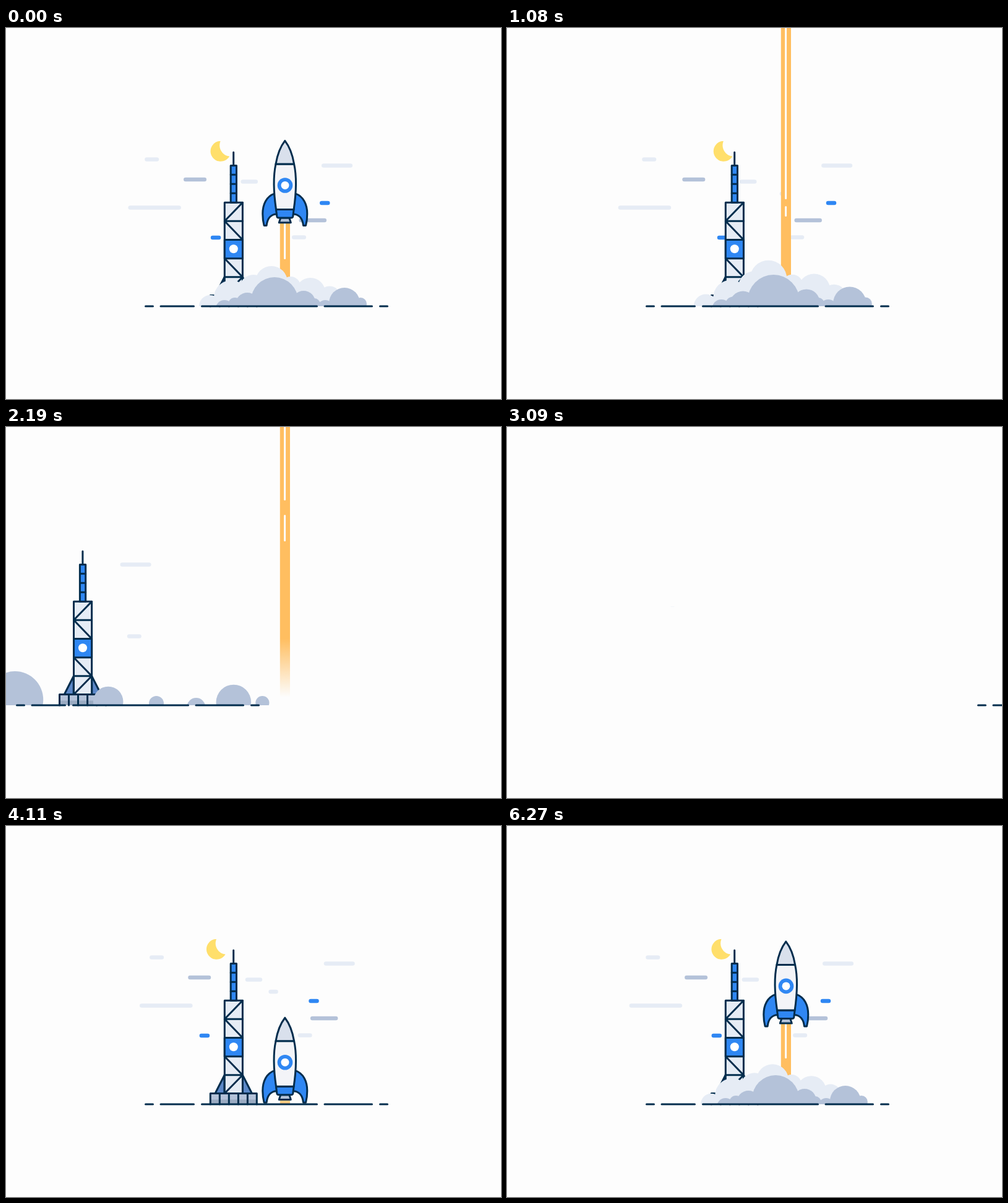
Animation, 800 px wide and 600 px high, one loop 6.3 s. Source, as an HTML page with a canvas:

```html
<!DOCTYPE html>
<html lang="en">
<head>
<meta charset="utf-8">
<title>Rocket launch</title>
<style>
html, body { margin: 0; width: 100%; height: 100%; overflow: hidden; background: #fdfdfd; }
canvas { display: block; }
</style>
</head>
<body>
<canvas id="stage" width="800" height="600"></canvas>
<script>
const ctx = document.getElementById('stage').getContext('2d');
const LOOP = 6300;
const BG = '#fdfdfd', NAVY = '#022d4d', BLUE = '#2f87f3', LIGHT = '#e6ecf5',
  GREY = '#b4c2d9', ORANGE = '#ffbe60', YELLOW = '#ffdf6b';

const clamp = v => Math.max(0, Math.min(1, v));
const easeOut = (v, power) => 1 - Math.pow(1 - clamp(v), power);
// Everything leaves to the left on a cubic and arrives from the right on a quartic.
const leave = (s, start) => -9.3e-7 * Math.pow(Math.max(0, s - start), 3);
const arrive = (s, start) => 800 * (1 - easeOut((s - start) / 850, 4));

// x, y, width, drift per second, colour, appears at, leaves at
const clouds = [
  [197.4, 290.5, 85.5, -8.5, LIGHT, -3225, 871],
  [224.2, 212.5, 23, -3.6, LIGHT, -3150, 950],
  [379.5, 248.5, 27.5, -3.3, LIGHT, -3080, 1240],
  [435.3, 268, 15.5, 5, LIGHT, -3010, 1300],
  [510, 222.5, 50, -1.7, LIGHT, -2950, 1488],
  [462, 338.5, 23, -4.4, LIGHT, -2890, 1539],
  [287, 245, 37, -3.3, GREY, -2830, 1030],
  [473.5, 311, 44.5, -8.4, GREY, -2770, 1365],
  [330.8, 339, 16.5, 8.3, BLUE, -2710, 1100],
  [507, 283, 16.5, 8.1, BLUE, -2650, 1335]
];

// x, y, radius, their rates per second, appears at, leaves at
const lightPuffs = [
  [330, 450, 19.5, -8, 0, 0, -260, 1230],
  [364, 436, 28, -2, 0, 0.5, -500, 1250],
  [400, 422, 23, -1, -3, 2, -650, 1280],
  [429, 411, 26, -6, -5, 3.5, -1600, 1300],
  [460, 418, 16, 1, -2, 1, -950, 1325],
  [492, 428, 24, 4, -4, 2, -850, 1345],
  [523, 435, 17.5, 5, 0, 2.5, -750, 1365]
];
const greyPuffs = [
  [353, 454, 14, -6, 0, 1, -1650, 1370],
  [370, 447, 11, -4, 0, 1.5, -1700, 1390],
  [390, 447, 19, -8, 0, 2.2, -1750, 1405],
  [434, 441, 38, -3, 0, 3.6, -1900, 1427],
  [481, 444, 19, 2.7, 0, 2.4, -1850, 1488],
  [498, 447, 10, 4, 0, 0.9, -1800, 1533],
  [516, 453, 13, 3, 0, 0.9, -1770, 1576],
  [547, 445, 25, 6.3, 0, 1.5, -1730, 1598],
  [573, 446, 10, 5.8, 0, 0.5, -1690, 1621]
];

function paint(path, fill, stroke = true) {
  const p = new Path2D(path);
  if (fill) { ctx.fillStyle = fill; ctx.fill(p); }
  if (stroke) { ctx.strokeStyle = NAVY; ctx.lineWidth = 3; ctx.stroke(p); }
}

function disc(x, y, r, fill) {
  ctx.fillStyle = fill;
  ctx.beginPath();
  ctx.arc(x, y, r, 0, Math.PI * 2);
  ctx.fill();
}

function line(x1, y1, x2, y2, color, width) {
  ctx.strokeStyle = color;
  ctx.lineWidth = width;
  ctx.beginPath();
  ctx.moveTo(x1, y1);
  ctx.lineTo(x2, y2);
  ctx.stroke();
}

function at(x, y, draw) {
  ctx.save();
  ctx.translate(x, y);
  draw();
  ctx.restore();
}

function drawClouds(s) {
  for (const [x, y, w, drift, color, start, end] of clouds) {
    const scale = easeOut((s - start) / 400, 1.8);
    if (!scale) continue;
    const cx = x + w / 2 + drift * s / 1000 + leave(s, end);
    const half = (w - 6.6) / 2 * scale;
    line(cx - half, y, cx + half, y, color, 6.6 * scale);
  }
}

function drawMoon(s) {
  const scale = easeOut((s + 2590) / 350, 3);
  if (!scale) return;
  at(347 + s * 0.003 + leave(s, 1170), 199.3, () => {
    ctx.scale(scale, scale);
    ctx.fillStyle = YELLOW;
    ctx.beginPath();
    ctx.arc(0, 0, 16.5, 0.546, Math.PI * 1.5);
    ctx.arc(16, -9.5, 17.8, 3.55, 1.68, true);
    ctx.fill();
  });
}

function drawTower(s) {
  at(arrive(s, -3230) + leave(s, 1550), 0, () => {
    paint('M353 403L338 432.5H353ZM382.5 403L397.5 432.5H382.5Z', '#5c88c8');
    paint('M330.3 432.5H405.3V450H330.3Z', GREY, false);
    paint('M330.3 442.5H405.3V450H330.3Z', '#9aabc2', false);
    paint('M330.3 450V432.5H405.3V450M345.3 432.5V450M360.3 432.5V450M375.4 432.5V450M390.4 432.5V450');
    paint('M353.3 282.3H382.4V432.5H353.3Z', LIGHT);
    paint('M353.3 342.5H382.4V372.8H353.3Z', BLUE);
    paint('M353.3 312.3H382.4M353.3 402.8H382.4M382.4 282.3L353.3 312.3L382.4 342.5M353.3 372.8L382.4 402.8L353.3 432.5');
    paint('M363.2 222.5H372.5V282.3H363.2Z', BLUE);
    paint('M363.2 237.3H372.5M363.2 252.2H372.5M363.2 267.2H372.5M367.7 201V222.5');
    disc(367.8, 357.3, 7, '#fff');
  });
}

function drawFlame(s, top) {
  const alpha = clamp((s + 2500) / 400);
  const bottom = 450 - 3.85e-6 * Math.pow(Math.max(0, s - 2040), 3);
  top = Math.max(top, -10);
  if (!alpha || bottom <= top) return;
  const fade = 95 * clamp((s - 1100) / 900);
  ctx.globalAlpha = alpha;
  ctx.fillStyle = ORANGE;
  if (fade) {
    const g = ctx.createLinearGradient(0, bottom - fade, 0, bottom);
    g.addColorStop(0, ORANGE);
    g.addColorStop(1, 'rgba(255,190,96,0)');
    ctx.fillStyle = g;
  }
  ctx.fillRect(442.8, top, 16.2, bottom - top);
  ctx.globalAlpha = 1;

  const end = 374 - 0.064 * s - 2.4e-5 * s * s;
  if (end > top + 2) line(450.6, top, 450.6, end - 1.5, BG, 3);
  const dashTop = 288 - 0.1315 * (s - 1080), dashEnd = 305 - 0.108 * (s - 1080);
  if (dashEnd - dashTop > 3) line(450.6, dashTop + 1.5, 450.6, dashEnd - 1.5, BG, 3);
}

function drawRocket(s) {
  const q = Math.max(0, 3.377 + 0.00098 * s);
  const nose = 311.5 - Math.pow(q, 4) - 1.9e-7 * Math.pow(Math.max(0, s - 300), 3);
  const dx = arrive(s, -3180);
  drawFlame(s, nose + 130);
  if (nose < -150) return;
  at(450.8 + dx, nose, () => {
    const fin = 'M-17 86.5C-30 91 -36 104 -36 119C-36 126 -35 133 -33.7 138H-29.7C-28.5 127 -23 119.5 -13 119.5Z';
    paint(fin, BLUE);
    at(0, 0, () => { ctx.scale(-1, 1); paint(fin, BLUE); });
    paint('M-7 125.5H7L9.5 133.2H-9.5Z', GREY);
    paint('M-14.3 112H14.3L13 123Q12.6 125.5 10 125.5H-10Q-12.6 125.5 -13 123Z', BLUE);
    paint('M-14.8 38.5C-19 58 -18.7 82 -14.3 112H14.3C18.7 82 19 58 14.8 38.5Z', '#f3f4f8');
    paint('M0 1C-7 10 -12 22 -14.8 38.5H14.8C12 22 7 10 0 1Z', '#d9e0ec');
    disc(0.2, 73, 12.3, BLUE);
    disc(0.2, 73, 6.5, '#fff');
  });
}

function drawPuffs(s, puffs, color) {
  const sec = s / 1000;
  for (const [x, y, r, vx, vy, vr, start, end] of puffs) {
    const grow = easeOut((s - start) / 450, 3);
    if (!grow) continue;
    disc(x + vx * sec + leave(s, end), y + vy * sec, (r + vr * sec) * grow, color);
  }
}

function drawSmoke(s) {
  ctx.save();
  ctx.beginPath();
  ctx.rect(0, 0, 800, 450);
  ctx.clip();
  drawPuffs(s, lightPuffs, LIGHT);
  drawPuffs(s, greyPuffs, GREY);
  ctx.restore();
}

function drawGround(s) {
  at(arrive(s, -3291) + leave(s, 1583), 0, () =>
    paint('M225.5 450H237.5M250 450H303.5M316.5 450H502.5M515 450H591.5M604.5 450H616.5'));
}

function frame(now) {
  const t = now % LOOP;
  // One continuous run from assembly to departure; the cut falls on the empty stage.
  const s = t < 2800 ? t : t - LOOP;
  ctx.fillStyle = BG;
  ctx.fillRect(0, 0, 800, 600);
  ctx.lineCap = ctx.lineJoin = 'round';
  drawClouds(s);
  drawMoon(s);
  drawTower(s);
  drawRocket(s);
  drawSmoke(s);
  drawGround(s);
}

let origin;
function tick(now) {
  if (origin === undefined) origin = now;
  frame(now - origin);
  requestAnimationFrame(tick);
}
frame(0);
requestAnimationFrame(tick);
</script>
</body>
</html>
```
